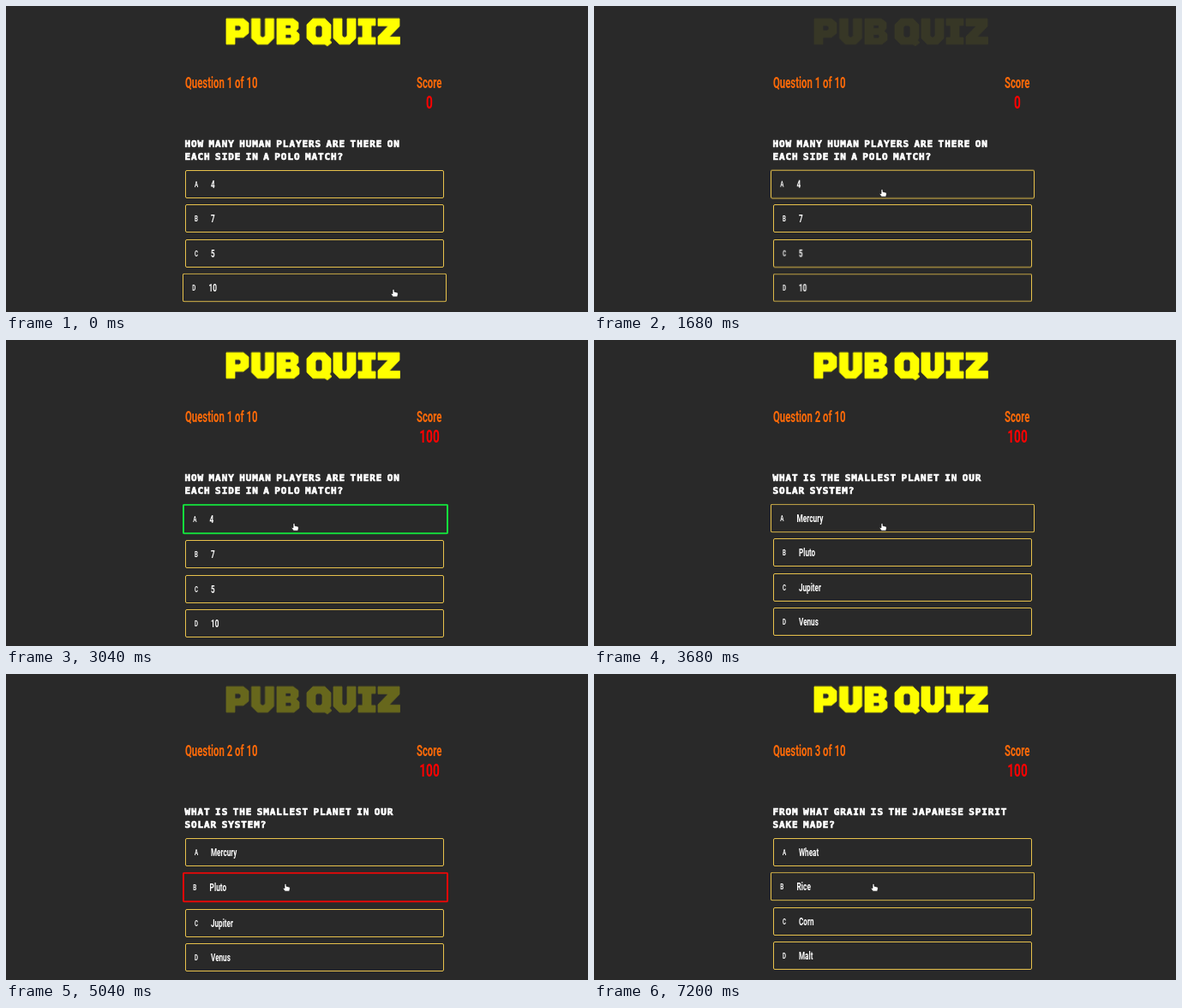
Animation of 679 by 358 pixels, one loop 7280 ms. Source, as an HTML page:

```html
<!DOCTYPE html>
<html lang="en">
<head>
<meta charset="utf-8">
<title>Pub quiz</title>
<style>
  :root { --loop: 7280ms; --gold: #e8c24c; }
  html, body { margin: 0; width: 100%; height: 100%; overflow: hidden; background: #292929; }
  .stage { position: relative; width: 679px; height: 358px; overflow: hidden; color: #fff; }
  .stage > *, .row > * { position: absolute; white-space: nowrap; }

  /* title */
  .title { left: 0; top: 0; fill: #ff0; stroke: #ff0; stroke-width: .8; stroke-linejoin: round; fill-rule: evenodd; animation: flash var(--loop) ease-in-out infinite; }
  .title path { animation: hop var(--loop) calc(var(--i) * 50ms) infinite; }
  @keyframes flash {
    0%, 15.48%, 33.38%, 56.69%, 74.59%, 98.9% { opacity: 1; }
    24.78%, 65.99% { opacity: 0; }
    100% { opacity: .95; }
  }
  @keyframes hop {
    0%, 36.4%, 77.61%, 100% { transform: none; }
    33.38%, 74.59% { transform: none; animation-timing-function: ease-out; }
    34.89%, 76.1% { transform: translateY(-10px); animation-timing-function: ease-in; }
  }

  /* text */
  .narrow { font-family: Roboto, sans-serif; font-weight: 700; transform: scaleX(.65); transform-origin: 0 50%; }
  .label { top: 80px; font-size: 17.5px; line-height: 20px; color: #ff6a08; }
  .count { left: 208.5px; }
  .score-label { right: 170.7px; transform-origin: 100% 50%; }
  .score { left: 444px; top: 103px; width: 100px; text-align: center; font-size: 21px; line-height: 20px; color: #f00; transform-origin: 50% 50%; }
  .ask { left: 208.5px; top: 153.5px; font: 700 11px/15.5px "DejaVu Sans Mono", monospace; letter-spacing: .9px; word-spacing: -2px; text-transform: uppercase; -webkit-text-stroke: .7px #fff; }

  /* answers */
  .list { left: 208.5px; top: 192px; }
  .row { position: relative; width: 300px; height: 30.5px; margin-bottom: 7.8px; border: 1px solid var(--gold); border-radius: 2px; }
  .key, .ans { top: 0; line-height: 32px; }
  .key { left: 9.5px; font-size: 9.5px; }
  .ans { left: 28.7px; font-size: 12.5px; }
  .a { animation: over-a var(--loop) linear infinite, right var(--loop) step-end infinite; }
  .b { animation: over-b var(--loop) linear infinite, wrong var(--loop) step-end infinite; }
  .c { animation: over-c var(--loop) linear infinite; }
  .d { animation: over-d var(--loop) linear infinite; }
  @keyframes over-a {
    0%, 21.1%, 60.2%, 100% { transform: scale(1); }
    22.3%, 59.1% { transform: scale(1.02); }
  }
  @keyframes over-b {
    0%, 18.05%, 21.7%, 62.8% { transform: scale(1); }
    19.3%, 20.55%, 64%, 100% { transform: scale(1.02); }
  }
  @keyframes over-c {
    0%, 8.8%, 18.6%, 100% { transform: scale(1); }
    10.1%, 17.4% { transform: scale(1.02); }
  }
  @keyframes over-d {
    0%, 7.2% { transform: scale(1.02); }
    8.5%, 100% { transform: scale(1); }
  }
  @keyframes right { 31.3% { border: 2px solid #14e03c; } 45.05% { border: 1px solid var(--gold); } }
  @keyframes wrong { 68.1% { border: 2px solid #e60808; } 81.9% { border: 1px solid var(--gold); } }

  /* hard switches */
  .q1, .q2, .q3, .before, .after, .hand, .arrow { animation: var(--loop) step-end infinite; }
  .q1 { animation-name: q1; }
  .q2 { animation-name: q2; }
  .q3 { animation-name: q3; }
  .before { animation-name: before; }
  .after { animation-name: after; }
  .hand { animation-name: hand; }
  .arrow { animation-name: arrow; }
  @keyframes q1 { 0% { visibility: visible; } 45.05%, 100% { visibility: hidden; } }
  @keyframes q2 { 0%, 81.9%, 100% { visibility: hidden; } 45.05% { visibility: visible; } }
  @keyframes q3 { 0% { visibility: hidden; } 81.9%, 100% { visibility: visible; } }
  @keyframes before { 0% { visibility: visible; } 31.3%, 100% { visibility: hidden; } }
  @keyframes after { 0% { visibility: hidden; } 31.3%, 100% { visibility: visible; } }
  @keyframes hand {
    0%, 8.8%, 18.05%, 21.1%, 62.8%, 100% { visibility: visible; }
    7.2%, 17.4%, 20.55%, 59.1% { visibility: hidden; }
  }
  @keyframes arrow {
    0%, 8.8%, 18.05%, 21.1%, 62.8%, 100% { visibility: hidden; }
    7.2%, 17.4%, 20.55%, 59.1% { visibility: visible; }
  }

  /* pointer */
  .pointer { left: .5px; top: -.5px; overflow: visible; fill: #fff; stroke: #111; stroke-width: .7; stroke-linejoin: round; animation: move var(--loop) linear infinite; }
  @keyframes move {
    0%, 2.7% { transform: translate(451px, 331px); }
    13.7%, 16.5% { transform: translate(365px, 284px); }
    22%, 52.2% { transform: translate(335px, 214px); }
    59.9%, 61.5% { transform: translate(326px, 225px); }
    64.6%, 100% { transform: translate(325px, 245px); }
  }
</style>
</head>
<body>
<div class="stage">
  <svg class="title" width="679" height="60" role="img" aria-label="Pub quiz">
    <g transform="translate(257 14.7)"><path style="--i:0" d="M0 0H20L26 5V17L20 22H10V30H0ZM10 8V14H15L17 12.5V9.5L15 8Z"/></g>
    <g transform="translate(286.5 14.7)"><path style="--i:1" d="M0 0H10V20L12 22H14L16 20V0H26V23L19 30H7L0 23Z"/></g>
    <g transform="translate(316 14.7)"><path style="--i:2" d="M0 0H19L25 4.5V11.5L22.5 14.5L26 18V25L20 30H0ZM10 7.5H15L16.5 8.5V10.5L15 11.5H10ZM10 18.5H15.5L17 19.7V21.7L15.5 22.9H10Z"/></g>
    <g transform="translate(351 14.7)"><path style="--i:3" d="M7 0H21L28 7V23L26.5 25L29 28L24 32L21 30H7L0 23V7ZM12 8L10 10V20L12 22H16L18 20V10L16 8Z"/></g>
    <g transform="translate(382 14.7)"><path style="--i:4" d="M0 0H10V20L12 22H14L16 20V0H26V23L19 30H7L0 23Z"/></g>
    <g transform="translate(411 14.7)"><path style="--i:5" d="M0 0H20V8H15V22H20V30H0V22H5V8H0Z"/></g>
    <g transform="translate(434 14.7)"><path style="--i:6" d="M0 0H25V9L13 21.5H25.5V30H0V21L12 8.5H0Z"/></g>
  </svg>

  <div class="label count narrow q1">Question 1 of 10</div>
  <div class="label count narrow q2">Question 2 of 10</div>
  <div class="label count narrow q3">Question 3 of 10</div>
  <div class="label score-label narrow">Score</div>
  <div class="score narrow before">0</div>
  <div class="score narrow after">100</div>

  <div class="ask q1">How many human players are there on<br>each side in a polo match?</div>
  <div class="ask q2">What is the smallest planet in our<br>solar system?</div>
  <div class="ask q3">From what grain is the Japanese spirit<br>sake made?</div>

  <div class="list">
    <div class="row a">
      <span class="key narrow">A</span>
      <span class="ans narrow q1">4</span><span class="ans narrow q2">Mercury</span><span class="ans narrow q3">Wheat</span>
    </div>
    <div class="row b">
      <span class="key narrow">B</span>
      <span class="ans narrow q1">7</span><span class="ans narrow q2">Pluto</span><span class="ans narrow q3">Rice</span>
    </div>
    <div class="row c">
      <span class="key narrow">C</span>
      <span class="ans narrow q1">5</span><span class="ans narrow q2">Jupiter</span><span class="ans narrow q3">Corn</span>
    </div>
    <div class="row d">
      <span class="key narrow">D</span>
      <span class="ans narrow q1">10</span><span class="ans narrow q2">Venus</span><span class="ans narrow q3">Malt</span>
    </div>
  </div>

  <svg class="pointer" width="10" height="12">
    <path class="hand" d="M-1 .7Q0 -.4 1 .7V3.2L4.6 4.2Q5.6 4.6 5.4 6L4.7 9.2H-.5L-3 6Q-2.8 4.6 -1 5.8Z"/>
    <path class="arrow" d="M0 0V8.4L2 6.6L3.4 9.6L4.8 9L3.5 6.1H6Z"/>
  </svg>
</div>
</body>
</html>
```
